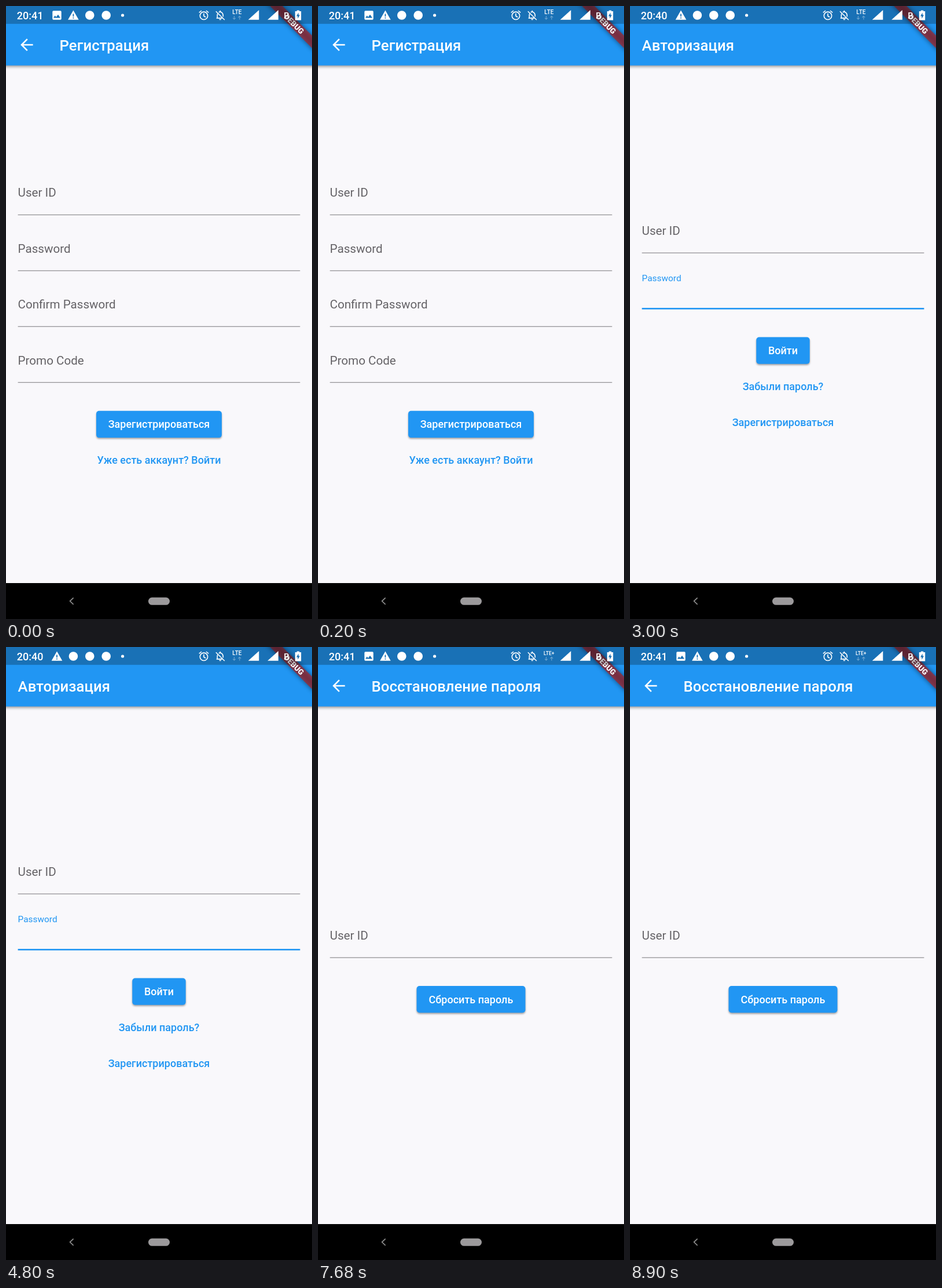
An HTML page that plays this animation: 529x1058 px, repeating every 9000 ms.

```html
<!DOCTYPE html>
<html lang="ru">
<head>
<meta charset="utf-8">
<title>Экраны входа</title>
<style>
  html, body { margin: 0; width: 100%; height: 100%; overflow: hidden; background: #f9f8fb; }
  svg { position: absolute; inset: 0; width: 100%; height: 100%; font-family: Roboto, sans-serif; }
  .title { font-size: 25.7px; font-weight: 500; fill: #fff; }
  .label { font-size: 20.6px; fill: #646266; }
  .float { font-size: 15.4px; fill: #2196f3; }
  .action { font-size: 18px; font-weight: 500; fill: #2196f3; text-anchor: middle; }
  .clock { font-size: 18px; font-weight: 500; }
  .net { text-anchor: middle; font-weight: 500; }
  .btn { fill: #2196f3; filter: drop-shadow(0 2px 1.4px rgba(0, 0, 0, .36)); }
  .bar { fill: #2196f3; filter: drop-shadow(0 2.5px 2.4px rgba(0, 0, 0, .42)); }
  .line { fill: none; stroke: #fff; }
</style>
</head>
<body>
<svg id="stage" viewBox="0 0 529 1058"></svg>
<script>
const LOOP = 9000;
const MID = 264.5;

const text = (cls, x, y, s) => `<text class="${cls}" x="${x}" y="${y}">${s}</text>`;
const at = (x, body) => `<g transform="translate(${x} 16)">${body}</g>`;

const field = (y, name) =>
  text('label', 20.6, y - 31.2, name) +
  `<rect x="20.6" y="${y - .7}" width="487.8" height="1.3" fill="#959497"/>`;

const focused = (y, name) =>
  text('float', 20.6, y - 47, name) +
  `<rect x="20.6" y="${y - 1.3}" width="487.8" height="2.6" fill="#2196f3"/>`;

const button = (y, w, s) =>
  `<rect class="btn" x="${MID - w / 2}" y="${y}" width="${w}" height="46.3" rx="5"/>` +
  `<text class="action" x="${MID}" y="${y + 29.6}" style="fill:#fff">${s}</text>`;

const link = (y, s) => text('action', MID, y, s);

const backArrow = '<path class="line" stroke-width="2.6" d="M46.6 67H28M36.8 57.2L27 67l9.8 9.8"/>';

// Status bar glyphs, each centred on its own origin.
const icons = {
  picture: '<path fill-rule="evenodd" d="M-6-7.7H6Q7.7-7.7 7.7-6V6Q7.7 7.7 6 7.7H-6Q-7.7 7.7-7.7 6V-6Q-7.7-7.7-6-7.7ZM-6 4.6H6L2-1.2-1.2 3-3.3.4Z"/>',
  warning: '<path fill-rule="evenodd" d="M0-8.4L9.3 7.8H-9.3ZM-.9-2.6V2.2H.9V-2.6ZM-.9 3.8V5.6H.9V3.8Z"/>',
  disc: '<circle r="7.8"/>',
  dot: '<circle r="2.6"/>',
  alarm: '<g class="line" stroke-width="1.6"><circle cy=".8" r="6.7"/><path d="M0-3.2V1.3L3.2 3.2M-8.2-4.6L-4-8M8.2-4.6L4-8"/></g>',
  muted: '<path class="line" stroke-width="1.6" d="M-7.4-6.8L7.6 8M-4.6-2.6Q-5-1-5 1V4.8H4.2M-2.6-5.2C1-7.2 5-4.4 5 .4V2.6M-6.6 5H3.6M0-8.3V-5.5"/><path d="M-2 6.4H2Q1.6 8.3 0 8.3T-2 6.4"/>',
  signal: '<path d="M-9.3 7.8H9.3V-9Z"/>',
  battery: '<path fill-rule="evenodd" d="M-2.2-8.6H2.2V-7H5.2V8.4H-5.2V-7H-2.2ZM.7-4.6L-3 1.6H-.6V5.8L3 -.6H.7Z"/>'
};

const status = (time, left, net, netSize) =>
  '<g fill="#fff">' + text('clock', 18.8, 22.5, time) +
  left.map((name, i) => at(88 + i * 28.4, icons[name])).join('') +
  at(342, icons.alarm) + at(370.3, icons.muted) +
  `<text class="net" x="399.3" y="14" font-size="${netSize}">${net}</text>` +
  '<path class="line" opacity=".35" stroke-width="1.2" d="M394.5 17v6m-2.4-2.4l2.4 2.4l2.4-2.4M403.8 23.4v-6m-2.4 2.4l2.4-2.4l2.4 2.4"/>' +
  at(428, icons.signal) + at(461.5, icons.signal) +
  text('clock', 480.2, 21.6, 'B').replace('>', ' style="font-size:15px">') +
  at(505, icons.battery) + '</g>';

const banner =
  '<g transform="translate(529 0) rotate(45)">' +
  '<rect x="-60" y="36" width="120" height="15.4" opacity=".5" style="filter:blur(4px)"/>' +
  '<rect x="-60" y="36" width="120" height="15.4" fill="#b71c1c" fill-opacity=".627"/>' +
  '<text y="48.5" fill="#fff" font-size="13.1" font-weight="900" text-anchor="middle">DEBUG</text></g>';

const navBar =
  '<rect y="996" width="529" height="62"/>' +
  '<path class="line" style="stroke:#8c8c8c" stroke-width="1.7" d="M116.6 1021.3l-6 5.8l6 5.8"/>' +
  '<rect x="246" y="1020.8" width="37" height="13" rx="6.5" fill="#9c9a9c"/>';

const screen = (s) =>
  '<g class="screen" opacity="0"><rect width="529" height="996" fill="#f9f8fb"/>' +
  '<rect class="bar" x="-10" y="-10" width="549" height="112.6"/>' +
  (s.back ? backArrow : '') + text('title', s.back ? 92.6 : 20.6, 76.6, s.title) +
  s.body + banner + '<rect width="529" height="30.8" fill-opacity=".25"/>' + s.status + '</g>';

const recent = ['picture', 'warning', 'disc', 'disc', 'dot'];
const screens = [
  { from: 0, to: 3000, back: true, title: 'Регистрация',
    status: status('20:41', recent, 'LTE', 10),
    body: ['User ID', 'Password', 'Confirm Password', 'Promo Code']
      .map((name, i) => field(360.5 + i * 96.4, name)).join('') +
      button(698.8, 217, 'Зарегистрироваться') + link(790.2, 'Уже есть аккаунт? Войти') },
  { from: 3000, to: 6000, title: 'Авторизация',
    status: status('20:40', ['warning', 'disc', 'disc', 'disc', 'dot'], 'LTE', 10),
    body: field(426.2, 'User ID') + focused(522.3, 'Password') +
      button(571.5, 92.4, 'Войти') + link(662.9, 'Забыли пароль?') + link(724.6, 'Зарегистрироваться') },
  { from: 6000, to: LOOP, back: true, title: 'Восстановление пароля',
    status: status('20:41', recent, 'LTE+', 8.6),
    body: field(536.2, 'User ID') + button(585, 188, 'Сбросить пароль') }
];

const stage = document.getElementById('stage');
stage.innerHTML = screens.map(screen).join('') + navBar;

// Hard cuts: each screen is opaque only inside its own span.
stage.querySelectorAll('.screen').forEach((el, i) => {
  const { from, to } = screens[i];
  const keys = [[0, from ? 0 : 1], [from, 1], [to, to < LOOP ? 0 : 1], [LOOP, to < LOOP ? 0 : 1]]
    .map(([t, opacity]) => ({ offset: t / LOOP, opacity, easing: 'step-end' }));
  const anim = el.animate(keys, { duration: LOOP, iterations: Infinity });
  anim.startTime = 0;
  anim.startTime = document.timeline.currentTime;
});
</script>
</body>
</html>
```
